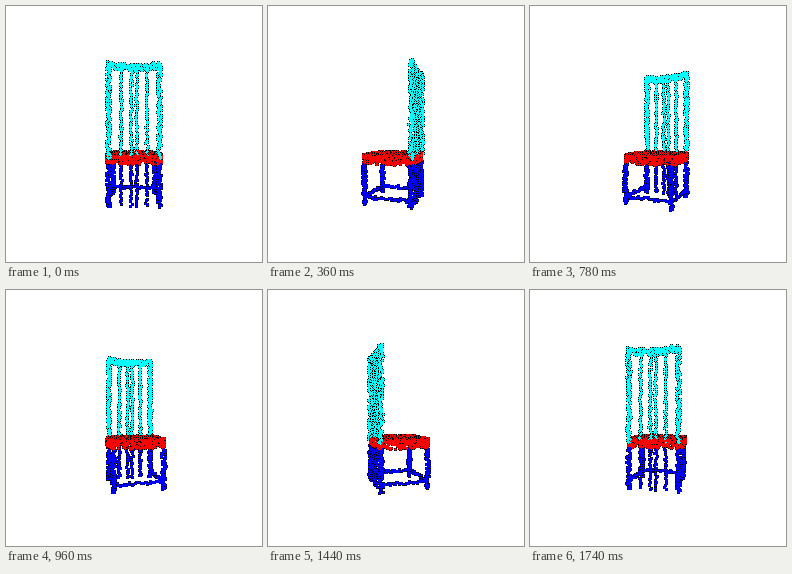
These frames come from a looping animation (256 px wide and 256 px high, 1.8 s). A matplotlib script:

```python
import numpy as np
import matplotlib.pyplot as plt
from matplotlib.animation import FuncAnimation

SIZE, FRAMES, STEP_MS = 256, 30, 60
CAMERA = 222  # distance from the turning axis, also the focal length in pixels
CYAN, RED, BLUE = (0, 255, 255), (255, 0, 0), (0, 0, 255)
SPINDLES = (-11.7, -2.6, 2.6, 11.7)

rng = np.random.default_rng(7)


def spread(n, low, high):
    """Random values, one in each of n equal slices, in random order."""
    return low + (high - low) * rng.permutation(np.arange(n) + rng.random(n)) / n


def box(n, u, d, z):
    """Random points in a box: u sideways, d towards the back, z up."""
    return np.column_stack([spread(n, *span) for span in (u, d, z)])


def column(n, u, d, z, w=1.0):
    return box(n, (u - w, u + w), (d - w, d + w), z)


def top_rail(n):
    p = box(n, (-25, 25), (20, 23), (0, 1))
    p[:, 2] = 65.8 - 2 * (1 - (p[:, 0] / 25) ** 2) - 6.5 * p[:, 2]
    return p


def seat(rim_count, top_count, power=6):
    """Rounded slab: points around its rim and over its top."""
    t = spread(rim_count + top_count, 0, 2 * np.pi)
    c, s = np.cos(t), np.sin(t)
    r = (np.abs(c) ** power + np.abs(s) ** power) ** (-1 / power)
    r[rim_count:] *= np.sqrt(spread(top_count, 0, 1))
    z = np.append(spread(rim_count, -27, -19), spread(top_count, -20, -19))
    return np.column_stack([26 * r * c, 24.5 * r * s - 2, z])


def build():
    back = [top_rail(135)]
    base = [box(40, (-23, 23), (-24.5, -23), (-59.5, -57))]
    for side in (-1, 1):
        u = 23 * side
        back.append(column(115, u, 21.5, (-22, 64), 1.9))
        base.append(column(65, u, 21, (-65.5, -27), 1.8))
        base.append(column(65, u, -23.5, (-65.5, -27), 1.8))
        base.append(box(38, (u - 0.8, u + 0.8), (-23, 21), (-59.5, -57)))
    for u in SPINDLES:
        back.append(column(54, u, 21.5, (-22, 60)))
        base.append(column(23, u, 21.5, (-65, -27)))

    parts = [(np.vstack(back), CYAN), (seat(560, 420), RED), (np.vstack(base), BLUE)]
    points = np.vstack([p for p, _ in parts])
    colors = np.vstack([np.tile(c, (len(p), 1)) for p, c in parts])
    return points, colors.astype(np.uint8)


points, colors = build()


def render(angle):
    """Splat each point as a 3 x 3 ball with dark corners, far to near."""
    u, d, z = points.T
    c, s = np.cos(angle), np.sin(angle)
    depth = d * c - u * s
    scale = CAMERA / (CAMERA - depth)
    x = np.floor(SIZE / 2 + (u * c + d * s) * scale).astype(int)
    y = np.rint(SIZE / 2 - z * scale).astype(int)

    xs, ys, near, tint = [], [], [], []
    for dx in (-1, 0, 1):
        for dy in (-1, 0, 1):
            corner = dx * dy != 0
            xs.append(x + dx)
            ys.append(y + dy)
            near.append(depth - 3 * corner)
            tint.append(colors * (not corner))
    order = np.argsort(np.concatenate(near), kind="stable")
    image = np.full((SIZE, SIZE, 3), 255, np.uint8)
    image[np.concatenate(ys)[order], np.concatenate(xs)[order]] = np.vstack(tint)[order]
    return image


fig = plt.figure(figsize=(SIZE / 100, SIZE / 100), dpi=100, facecolor="white")
ax = fig.add_axes([0, 0, 1, 1])
ax.axis("off")
picture = ax.imshow(render(0), interpolation="nearest", aspect="auto")


def update(i):
    picture.set_data(render(2 * np.pi * i / FRAMES))
    return [picture]


anim = FuncAnimation(fig, update, frames=FRAMES, interval=STEP_MS, repeat=True, repeat_delay=0)
plt.show()
```
